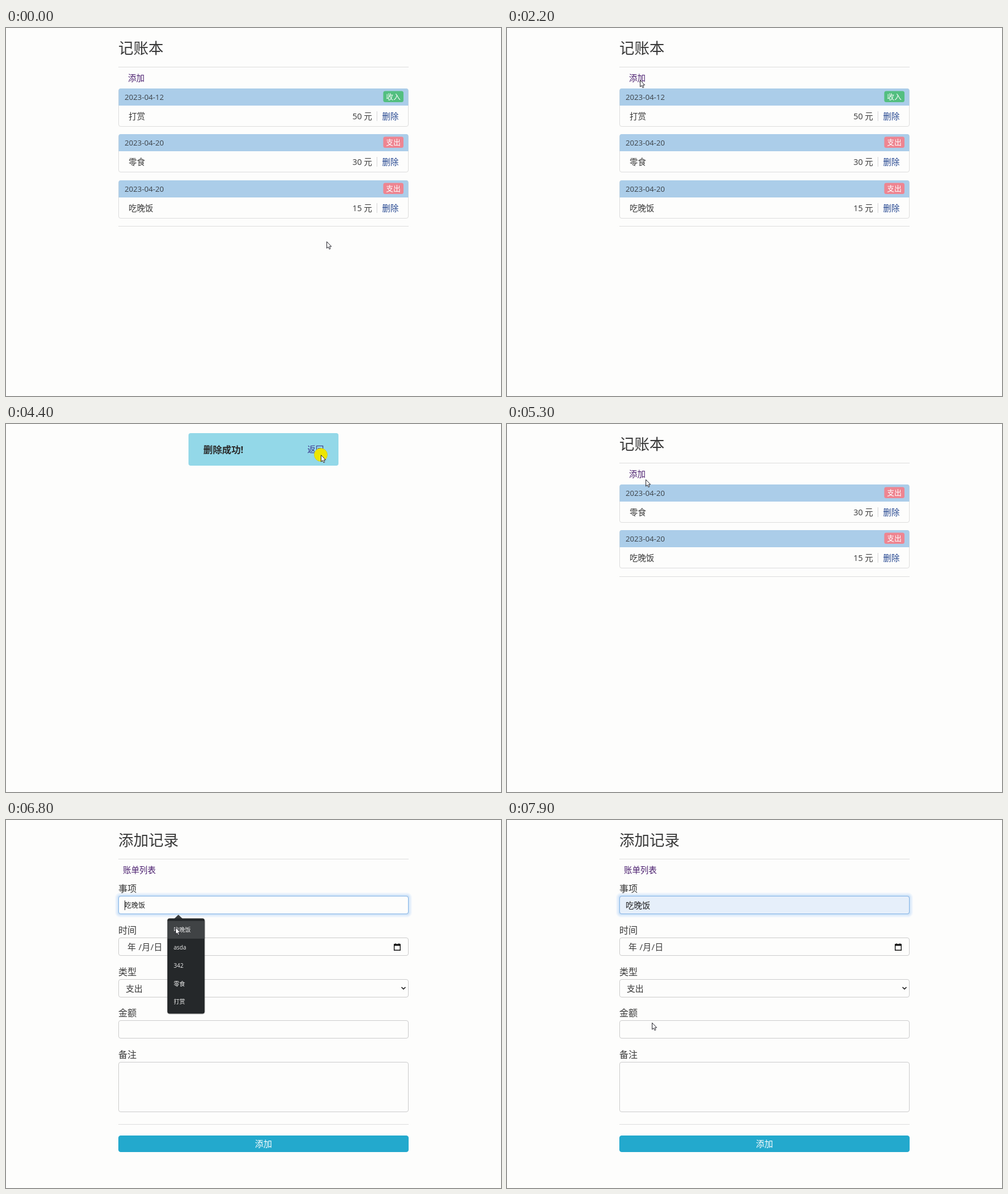
Recreate the animation shown at these times as an HTML page. Size 868 by 645 pixels, loop 8000 ms.

```html
<!DOCTYPE html>
<html lang="zh-CN">
<head>
<meta charset="utf-8">
<title>记账本</title>
<style>
  html, body { margin: 0; width: 100%; height: 100%; overflow: hidden; background: #fdfdfc; }
  svg { display: block; width: 868px; height: 645px; }
  text { font-family: "Open Sans", "Noto Sans CJK SC", "Noto Sans CJK", sans-serif; white-space: pre; }
</style>
</head>
<body>
<svg id="stage" viewBox="0 0 868 645" xmlns="http://www.w3.org/2000/svg"></svg>
<script>
const LOOP = 8000, STEP = 100, CLICK = 200;
const LEFT = 197, WIDTH = 509, PITCH = 80.4, FIELD_PITCH = 72.8;
const PAPER = '#fdfdfc', INK = '#383838', LINE = '#ddd', VISITED = '#4b1f6f';
const stage = document.getElementById('stage');

function set(node, attrs) {
  for (const key in attrs) node.setAttribute(key, attrs[key]);
}
function el(parent, tag, attrs = {}) {
  const node = document.createElementNS('http://www.w3.org/2000/svg', tag);
  set(node, attrs);
  return parent.appendChild(node);
}
const group = (parent = stage) => el(parent, 'g');
const show = (node, on) => set(node, { visibility: on ? 'inherit' : 'hidden' });
const rect = (g, x, y, width, height, fill, more = {}) =>
  el(g, 'rect', { x, y, width, height, fill, ...more });
const frame = (g, y, height, more) =>
  rect(g, LEFT + 0.5, y + 0.5, WIDTH - 1, height - 1, PAPER, { rx: 3.5, ...more });
const rule = (g, y) => rect(g, LEFT, y, WIDTH, 1, LINE);

// Text is placed by the middle of its line.
const line = (mid, size) => ({ y: mid + size * 0.37, 'font-size': size });
function text(g, str, x, mid, size, fill = INK, more = {}) {
  const node = el(g, 'text', { x, ...line(mid, size), fill, ...more });
  node.textContent = str;
  return node;
}

function header(g, title, link, linkX) {
  text(g, title, LEFT, 35.5, 26.4);
  rule(g, 68);
  text(g, link, linkX, 88, 14.4, VISITED);
}

function card(g, top, { date, kind, item, sum }) {
  frame(g, top, 67, { stroke: LINE });
  el(g, 'path', { d: `M197.5 ${top + 30}v-26q0-4 4-4h500q4 0 4 4v26z`, fill: '#abcde9' });
  text(g, date, 208, top + 15, 13.2, '#3c4248');
  rect(g, 661.5, top + 4.5, 35.5, 19.5, kind === '收入' ? '#53bf80' : '#ee8591', { rx: 3.5 });
  text(g, kind, 679.2, top + 14.3, 12.6, '#fff', { 'text-anchor': 'middle' });

  const mid = top + 49;
  text(g, item, 215, mid, 14.4);
  text(g, sum + ' 元', 642, mid, 14.4, INK, { 'text-anchor': 'end' });
  rect(g, 650, mid - 9, 1, 17, '#d6d6d6');
  text(g, '删除', 659.5, mid, 14.4, '#23458f');
}

function listPage(rows) {
  const g = group();
  const top = i => 106 + Math.round(i * PITCH);
  header(g, '记账本', '添加', 214);
  rows.forEach((row, i) => card(g, top(i), row));
  rule(g, top(rows.length));
  return g;
}

function donePage() {
  const g = group();
  rect(g, 320, 16, 263, 57, '#93d8e8', { rx: 4 });
  text(g, '删除成功!', 346, 45, 16.4, '#2b2b2b', { 'font-weight': 700 });
  text(g, '返回', 528.5, 45, 14.4, '#39328c');
  return g;
}

function formPage() {
  const g = group();
  header(g, '添加记录', '账单列表', 205);
  const boxes = ['事项', '时间', '类型', '金额', '备注'].map((label, i) => {
    const y = 133.5 + i * FIELD_PITCH;
    text(g, label, LEFT, y - 13.5, 16);
    return frame(g, Math.floor(y), label === '备注' ? 88 : 32);
  });
  const date = text(g, '年 /月/日', 0, 0, 15, INK, { 'letter-spacing': 0.4 });
  const kind = text(g, '支出', 0, 0, 15);
  const icon = group(g);
  el(icon, 'path', {
    d: 'M.7 2.2h10.6v10H.7zM3 .2v2M9 .2v2', fill: 'none', stroke: '#111', 'stroke-width': 1.4
  });
  rect(icon, 0, 1.5, 12, 3, '#111');
  el(g, 'path', {
    d: 'M693.5 293l3.5 3.4 3.5-3.4', fill: 'none', stroke: '#222', 'stroke-width': 1.7
  });
  rule(g, 533);
  const button = frame(g, 552, 30);
  const caption = text(g, '添加', 451.5, 567, 15, '#fff', { 'text-anchor': 'middle' });

  const focus = group(g);
  for (let grow = 6; grow > 0; grow--) {
    rect(focus, LEFT - grow, 133 - grow, WIDTH + 2 * grow, 32 + 2 * grow, '#5aa0ea',
      { rx: 3 + grow, 'fill-opacity': 0.1 / Math.sqrt(grow + 1) });
  }
  const input = frame(focus, 133, 32, { stroke: '#83b3e6' });
  const value = text(focus, '吃晚饭', 208, 150, 14.4, '#222');
  const caret = rect(focus, 208, 141, 1, 17, '#222');
  return { g, boxes, date, kind, icon, button, caption, focus, input, value, caret };
}

function menuPopup() {
  const g = group();
  rect(g, 282, 172, 67.5, 169, '#000', { rx: 5, 'fill-opacity': 0.12 });
  el(g, 'path', { d: 'M295 173l7.3-7 7.3 7z', fill: '#3a3d3f' });
  rect(g, 283, 172.5, 65.3, 167, '#25282a', { rx: 4 });
  const hover = rect(g, 283, 177, 65.3, 31, '#404345');
  ['吃晚饭', 'asda', '342', '零食', '打赏'].forEach((item, i) =>
    text(g, item, 294, 192 + i * 31.6, 10, '#eee'));
  return { g, hover };
}

const rows = [
  { date: '2023-04-12', kind: '收入', item: '打赏', sum: 50 },
  { date: '2023-04-20', kind: '支出', item: '零食', sum: 30 },
  { date: '2023-04-20', kind: '支出', item: '吃晚饭', sum: 15 }
];
const fullList = listPage(rows);
const shortList = listPage(rows.slice(1));
const done = donePage();
const form = formPage();
const menu = menuPopup();
const pointer = group();
const halo = el(pointer, 'circle', { r: 11.5, fill: '#ece500', stroke: '#c9c21c', 'stroke-width': 0.6 });
el(pointer, 'path', {
  d: 'M.5.5v11.6l2.6-2.4 1.9 4 1.9-.9-1.8-3.8h3.5z',
  fill: '#fff', stroke: '#23232b', 'stroke-width': 1, 'stroke-linejoin': 'round'
});

// Each page stays until the next one opens.
const pages = [
  { at: 0, view: fullList }, { at: 1300, view: form.g }, { at: 2200, view: fullList },
  { at: 3600, view: done }, { at: 4500, view: shortList }, { at: 6100, view: form.g }
];
const clicks = [2000, 3400, 4300, 5900, 6500, 6900];

// Pointer moves; "via" bends the way there.
const home = { x: 562, y: 374 };
const moves = [
  { from: 200, to: 1200, x: 228, y: 91, via: { x: 685, y: 300 } },
  { from: 1600, to: 1700, x: 236, y: 112 },
  { from: 1800, to: 2000, x: 233, y: 91 },
  { from: 2400, to: 3100, x: 678, y: 161, via: { x: 900, y: 235 } },
  { from: 3500, to: 4200, x: 552, y: 54 },
  { from: 4400, to: 4500, x: 539, y: 43 },
  { from: 4700, to: 5400, x: 233, y: 92, via: { x: 330, y: 150 } },
  { from: 6100, to: 6500, x: 299, y: 150 },
  { from: 6700, to: 6800, x: 297, y: 188 },
  { from: 7000, to: 7900, x: 254, y: 355, via: { x: 215, y: 260 } }
];

const mix = (a, b, p) => a + (b - a) * p;
const ramp = (t, a, b) => Math.min(1, Math.max(0, (t - a) / (b - a)));
const ease = p => (1 - Math.cos(Math.PI * p)) / 2;
const blend = (a, b, p) => `rgb(${a.map((c, i) => Math.round(mix(c, b[i], p)))})`;

function between(a, b, p) {
  return { x: mix(a.x, b.x, p), y: mix(a.y, b.y, p) };
}
function pointerAt(t) {
  let pos = home;
  for (const move of moves) {
    if (t < move.from) break;
    const p = ease(ramp(t, move.from, move.to));
    pos = move.via
      ? between(between(pos, move.via, p), between(move.via, move, p), p)
      : between(pos, move, p);
  }
  return pos;
}

// Controls ease from plain to styled while the page loads.
function styleForm(p) {
  const edge = blend([166, 166, 178], [204, 204, 204], p);
  const size = mix(14, 14.8, p), shift = mix(-3.5, 0, p);
  form.boxes.forEach(box => set(box, { stroke: edge, rx: mix(2, 3.5, p) }));
  set(form.date, { x: 213 + shift, ...line(222.4, size) });
  set(form.kind, { x: 210 + shift, ...line(295.3, size) });
  set(form.icon, { transform: `translate(${680 - shift} 216)` });
  set(form.button, {
    y: mix(552.5, 553.5, p),
    height: mix(25, 28, p),
    fill: blend([98, 192, 216], [35, 169, 205], p),
    stroke: blend([55, 125, 148], [35, 169, 205], p)
  });
  set(form.caption, {
    ...line(mix(565, 567.3, p), mix(14, 15, p)),
    fill: blend([132, 158, 168], [255, 255, 255], p)
  });
}

function styleInput(t) {
  const chosen = t >= 7100;
  show(form.focus, t >= 6500);
  show(form.value, t >= 6800);
  set(form.value, line(150, chosen ? 14.4 : 12));
  set(form.input, { fill: blend([253, 253, 252], [230, 239, 250], ramp(t, 7000, 7300)) });
  set(form.caret, { x: chosen ? 251 : 208 });
  show(form.caret, t < 7700);
  if (t < 6500 || t >= 7700) show(form.caret, false);
  show(menu.g, t >= 6700 && !chosen);
  show(menu.hover, t >= 6800 && !chosen);
}

function draw(time) {
  const t = Math.floor((time % LOOP) / STEP) * STEP;
  const page = pages.filter(p => p.at <= t).pop().view;
  [fullList, shortList, done, form.g].forEach(view => show(view, view === page));
  styleForm(t < 6100 ? 1 : ramp(t, 6100, 6400));
  styleInput(t);

  const { x, y } = pointerAt(t);
  set(pointer, { transform: `translate(${Math.round(x)} ${Math.round(y)})` });
  show(halo, clicks.some(at => t >= at && t < at + CLICK));
}

const start = performance.now();
function tick() {
  draw(performance.now() - start);
  requestAnimationFrame(tick);
}
tick();
</script>
</body>
</html>
```
